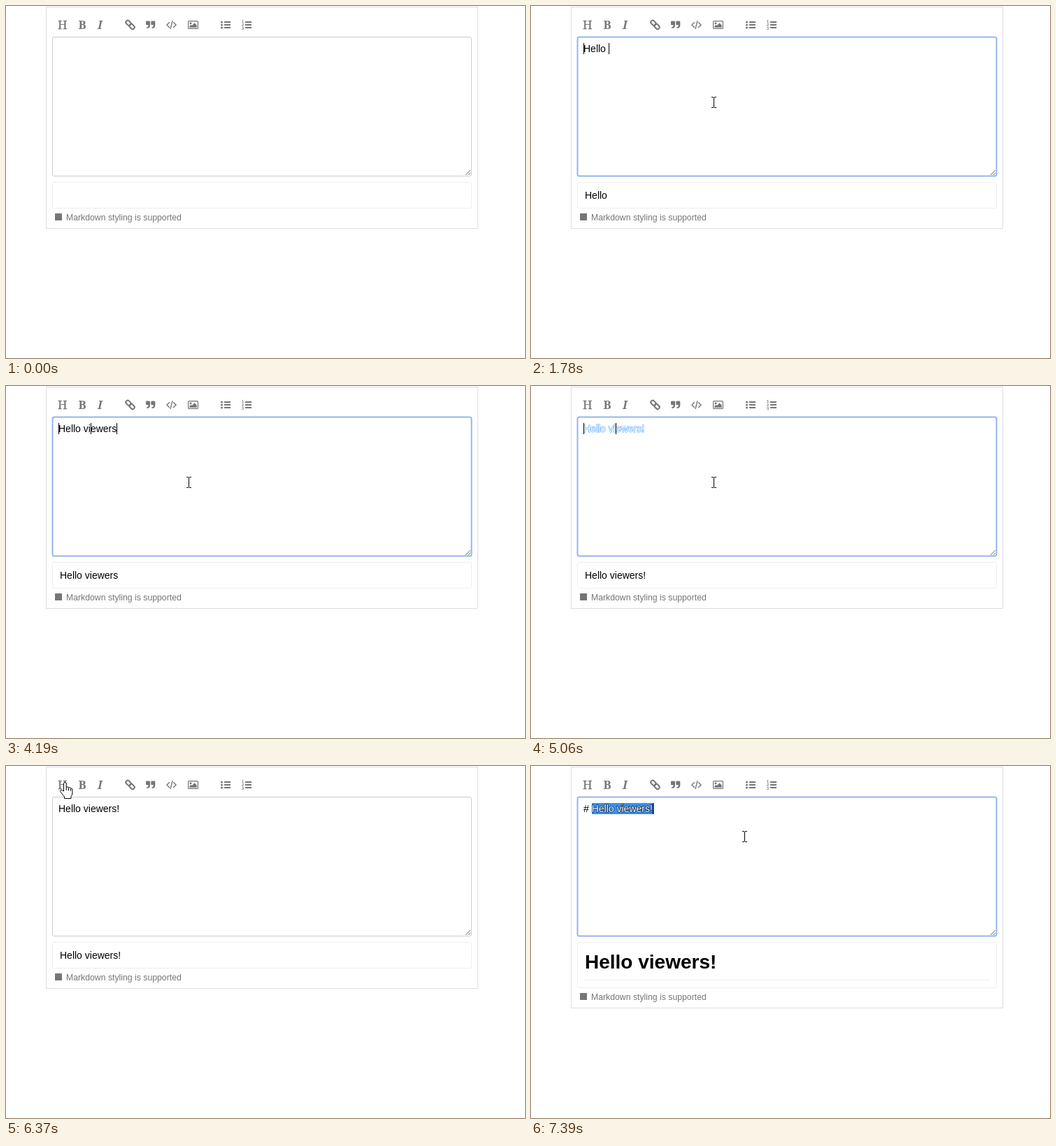
Write an HTML page that moves like this. It is 742 px wide and 504 px high and loops after 8 s.

```html
<!DOCTYPE html>
<html lang="en">
<head>
<meta charset="utf-8">
<title>Markdown editor</title>
<style>
html, body { margin: 0; width: 100%; height: 100%; overflow: hidden; background: #fff; }
svg { display: block; width: 742px; height: 504px; }
text { font: 14px "Liberation Sans", Arial, sans-serif; white-space: pre; }
.icon { fill: #767676; }
.icon text { font: 17px "Noto Serif", serif; }
.line { fill: none; stroke: #767676; }
.box { fill: #fff; stroke: #ddd; }
</style>
</head>
<body>
<svg viewBox="0 0 742 504">
  <rect id="panel" class="box" x="57.5" y="1.5" width="617" height="317"/>

  <g class="icon">
    <text x="74" y="33" stroke="#767676" stroke-width=".3">H</text>
    <text x="103.5" y="33" style="font-weight:700;font-size:16.5px">B</text>
    <text x="131" y="33" style="font-weight:700;font-style:italic;font-size:16.5px">I</text>
    <g class="line" stroke-width="2" transform="translate(177.5 26.8) rotate(45)">
      <rect x="-7.6" y="-2.7" width="8" height="5.4" rx="2.6"/>
      <rect x="-.4" y="-2.7" width="8" height="5.4" rx="2.6"/>
    </g>
    <path id="quote" d="M201.2 21.5h3.6q1.2 0 1.2 1.2v4.8q0 4.5-4.8 4.6v-1.9q2.4-.2 2.4-3h-2.4q-1.2 0-1.2-1.2v-3.3q0-1.2 1.2-1.2z"/>
    <use href="#quote" x="7.3"/>
    <path class="line" stroke-width="1.4" d="M233.8 23.3l-3.8 3.8 3.8 3.8M239.2 23.3l3.8 3.8-3.8 3.8M238 21.2l-3 11.8"/>
    <rect class="line" x="260.6" y="21.6" width="13.8" height="10.8" rx="1" stroke-width="1.2"/>
    <circle cx="264" cy="24.8" r="1.5"/>
    <path d="M262.3 30.8v-1.8l2.3-2.3 1.2 1.2 3.7-3.7 3.2 3.2v3.4z"/>
    <path d="M312 22h9v2h-9zM312 26h9v2h-9zM312 30h9v2h-9zM342 22h9v2h-9zM342 26h9v2h-9zM342 30h9v2h-9z"/>
    <circle cx="308.5" cy="23" r="1.5"/>
    <circle cx="308.5" cy="27" r="1.5"/>
    <circle cx="308.5" cy="31" r="1.5"/>
    <g style="font-weight:700">
      <text x="337" y="24.4" style="font:700 5.5px 'Liberation Sans',sans-serif">1</text>
      <text x="337" y="29.2" style="font:700 5.5px 'Liberation Sans',sans-serif">2</text>
      <text x="337" y="34" style="font:700 5.5px 'Liberation Sans',sans-serif">3</text>
    </g>
  </g>

  <rect id="area" x="66.5" y="44.5" width="599" height="199" rx="2.5" fill="#fff"/>
  <path class="line" d="M657 242l7-7M661 242l3-3" stroke-width="1"/>
  <rect id="mark" x="87" y="53" width="89" height="16" fill="#3390ff"/>
  <text id="typed" x="75" y="66"></text>
  <text id="picked" y="66" fill="#fff" paint-order="stroke">Hello viewers!</text>
  <g id="carets"></g>

  <rect id="preview" class="box" x="66.5" y="252.5" width="599" height="37" rx="2.5" stroke-dasharray="1 1"/>
  <text id="plain" x="77" y="276"></text>
  <g id="heading">
    <text x="77" y="290" style="font-size:28px;font-weight:700">Hello viewers!</text>
    <path d="M77 306.5H655" stroke="#eee"/>
  </g>

  <g id="footer">
    <rect x="70" y="297" width="10" height="10" fill="#767676"/>
    <text x="86" y="307" fill="#767676" style="font-size:12.25px">Markdown styling is supported</text>
  </g>

  <g id="menu" style="font-weight:700">
    <path d="M37.5 46.5H74.5L81 39.8l6.5 6.7H124.5V133.5H37.5z" fill="#fff" stroke="#d0d0d0"/>
    <text id="first" x="47" y="73" style="font-size:20px;font-weight:700">Header</text>
    <text x="47" y="99" style="font-size:18px;font-weight:700">Header</text>
    <text x="47" y="122" style="font-weight:700">Header</text>
  </g>

  <g id="beam" shape-rendering="crispEdges">
    <path d="M-3-8h3v1h1v-1h3v1h-3v14h3v1h-3v-1h-1v1h-3v-1h3v-14h-3z"/>
  </g>
  <g id="hand">
    <path d="M-2 13V2Q-2 .5-.2 .5T1.7 2V7.5Q2.2 6.6 3.5 6.8T5 8.3Q5.6 7.5 6.8 7.8T8 9.4Q8.8 8.7 9.6 9.2T10.4 11V16Q10.4 18.5 8.5 20.5V23.5H-1V21Q-2.6 19.6-3.8 17.5L-6.7 13.8Q-7.6 12.4-6.5 11.5T-3.8 12z" fill="#fff" stroke="#000" stroke-linejoin="round"/>
    <path d="M1.7 7.5v4.5M5 8.3v4M8 9.4v3.3" stroke="#000" fill="none"/>
  </g>
  <path id="arrow" d="M.5.5V16.5l3.8-3.6 2.4 5.6 2.4-1-2.4-5.5h5z" fill="#fff" stroke="#000"/>
</svg>

<script>
const LOOP = 8000, FULL = "Hello viewers!", LEFT = 75;
const keys = [1080, 1230, 1310, 1460, 1630, 1780, 2330, 2560, 3180, 3330, 3580, 4040, 4190, 4510];
const FOCUS = 460, SELECT = 5060, BLUR = 6300, OPEN = 6450, HOVER = 6610, APPLY = 6990, RESELECT = 7390;

// time, pointer shape, x, y: each pose holds until the next
const poses = [
  [70, "arrow", 299, 463], [150, "arrow", 287, 390], [230, "beam", 274, 270],
  [310, "beam", 265, 182], [390, "beam", 261, 138],
  [5760, "beam", 251, 134], [5840, "beam", 228, 121], [5920, "beam", 194, 100],
  [5990, "beam", 158, 78], [6070, "beam", 126, 58], [6150, "arrow", 102, 39],
  [6220, "hand", 88, 27], [6300, "hand", 84.5, 23], [6520, "hand", 85, 33],
  [6610, "hand", 87, 52], [6690, "hand", 89, 65], [6920, "beam", 89, 66],
  [6990, "beam", 128, 72], [7070, "beam", 208, 86], [7150, "beam", 277, 97],
  [7220, "beam", 305, 101]
];

const $ = id => document.getElementById(id);
const set = (id, attrs) => {
  for (const k in attrs) $(id).setAttribute(k, attrs[k]);
};
const show = (id, on) => set(id, { display: on ? "inline" : "none" });
const within = (t, a, b) => t >= a && t < b;

const pen = document.createElement("canvas").getContext("2d");
pen.font = '14px "Liberation Sans", Arial, sans-serif';
const caretAt = s => LEFT + Math.round(pen.measureText(s).width);

function drawPointer(t) {
  const pose = poses.filter(p => p[0] <= t).pop();
  for (const id of ["beam", "hand", "arrow"]) show(id, pose && pose[1] === id);
  if (pose) set(pose[1], { transform: `translate(${pose[2]} ${pose[3]})` });
}

function drawCarets(t, text) {
  const xs = [];
  if (within(t, FOCUS, BLUR)) {
    xs.push(LEFT);
    if (t >= keys[7]) xs.push(caretAt("Hello vi"));
    if (t < SELECT) xs.push(caretAt(text));
  }
  if (t >= APPLY) xs.push(174);
  $("carets").innerHTML = xs.map(x => `<rect x="${x}" y="53" width="1" height="16"/>`).join("");
}

function draw(t) {
  const text = FULL.slice(0, keys.filter(k => k <= t).length);
  const focused = within(t, FOCUS, BLUR) || t >= APPLY;
  const picked = within(t, SELECT, BLUR), marked = t >= RESELECT;
  const big = t >= APPLY, grow = big ? 28 : 0;

  set("panel", { height: 317 + grow });
  set("preview", { height: 37 + grow });
  set("footer", { transform: `translate(0 ${grow})` });
  set("area", { stroke: focused ? "#94b5ee" : "#ccc", "stroke-width": focused ? 2 : 1 });

  $("typed").textContent = marked ? "# " : picked ? "" : big ? "# " + FULL : text;
  $("plain").textContent = big ? "" : text;
  show("heading", big);
  show("mark", marked);
  show("picked", picked || marked);
  set("picked", {
    x: marked ? 86.7 : LEFT,
    stroke: marked ? "#123" : "#3b9bff",
    "stroke-width": marked ? 1.3 : 1
  });
  show("menu", within(t, OPEN, APPLY));
  set("first", { fill: t >= HOVER ? "#4078c0" : "#000" });
  drawCarets(t, text);
  drawPointer(t);
}

const start = performance.now();
function tick(now) {
  draw(Math.max(0, now - start) % LOOP);
  requestAnimationFrame(tick);
}
draw(0);
requestAnimationFrame(tick);
</script>
</body>
</html>
```
